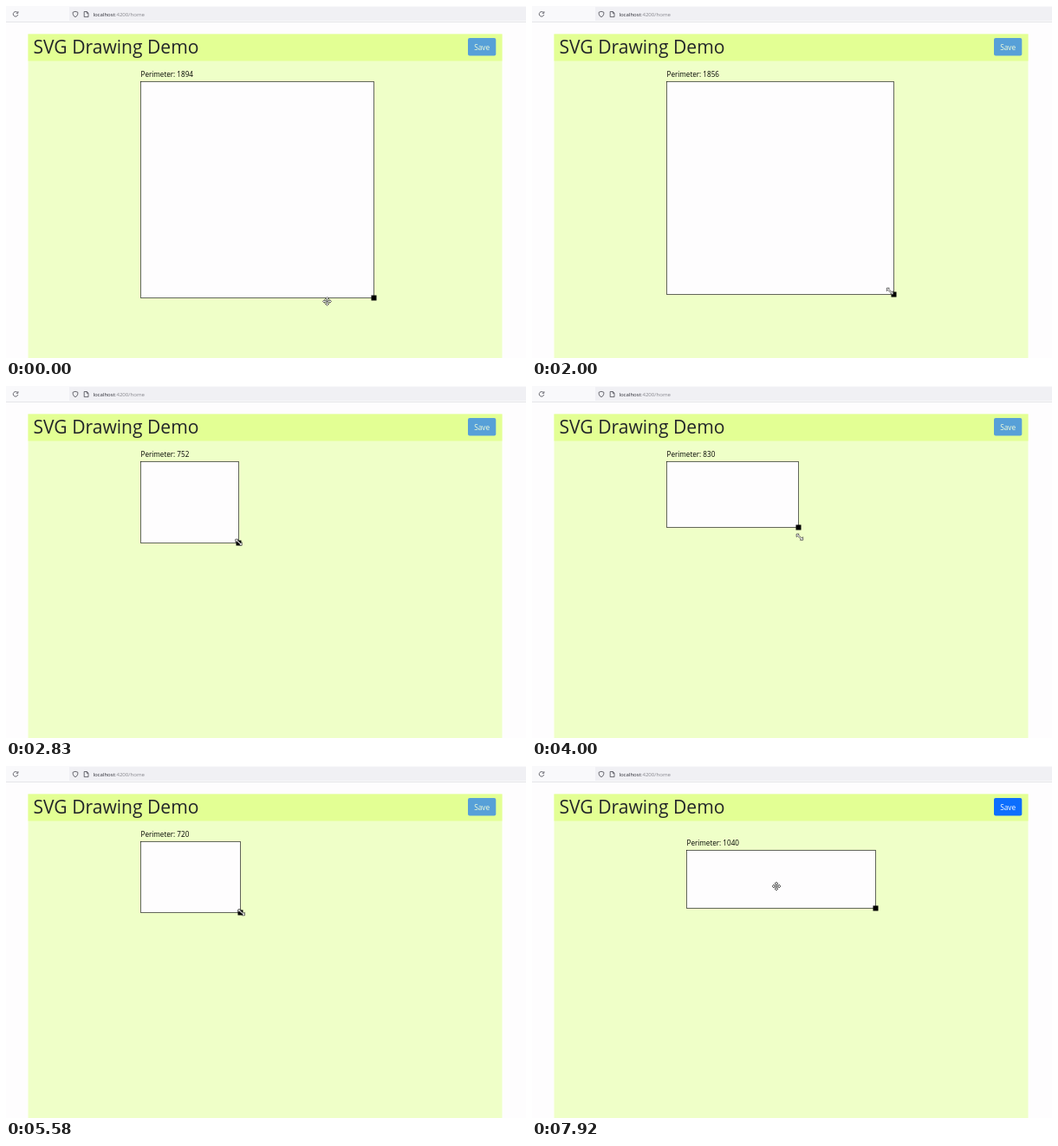
An HTML page that plays this animation: 600x407 px, repeating every 8000 ms.

```html
<!DOCTYPE html>
<html lang="en">
<head>
<meta charset="utf-8">
<title>SVG Drawing Demo</title>
<style>
  html, body { margin: 0; width: 100%; height: 100%; overflow: hidden; background: #fefdfe; }
  svg { display: block; width: 100%; height: 100%; font-family: "Open Sans", "Noto Sans", sans-serif; }
  .icon { fill: none; stroke: #4a4a52; stroke-width: .8; }
  .cursor path { fill: #fff; stroke: #2b2b2b; stroke-width: .7; }
</style>
</head>
<body>
<svg viewBox="0 0 600 407">
  <!-- browser bar -->
  <rect width="600" height="18" fill="#f9f9fb"/>
  <rect x="73" y="1" width="527" height="16" fill="#f0f0f4"/>
  <rect y="18" width="600" height=".7" fill="#dcdce0"/>
  <g class="icon">
    <path d="M13.4 7.8A2.8 2.8 0 1 0 13.8 10M13.9 6.2V8.3H11.8"/>
    <path d="M80 6.3L82.8 7.2V9.2Q82.6 11.6 80 12.8Q77.4 11.6 77.2 9.2V7.2Z"/>
    <path d="M90.2 6.5H93.3L95 8.2V12.6H90.2ZM93.2 6.6V8.3H95"/>
  </g>
  <text x="100.4" y="11.7" font-size="6.07" fill="#2a2a33">localhost<tspan fill="#85858c">:4200/home</tspan></text>

  <!-- page -->
  <rect x="25.5" y="32.5" width="547" height="374.5" fill="#efffc8"/>
  <rect x="25.5" y="32.5" width="547" height="31" fill="#e3ff94"/>
  <text x="31.5" y="54.8" font-size="21.05" fill="#212529">SVG Drawing Demo</text>
  <g id="save">
    <rect x="533" y="37" width="32.3" height="20.5" rx="2" fill="#0d6efd"/>
    <text x="549.2" y="50.6" font-size="8.3" fill="#fff" text-anchor="middle">Save</text>
  </g>

  <g id="shape">
    <text id="label" y="-5.5" font-size="8.12"></text>
    <rect id="box" fill="#fefdfe" stroke="#000" stroke-width=".6"/>
    <rect id="handle" width="6" height="6"/>
  </g>

  <g id="move" class="cursor">
    <path d="M-.8-.8V-3H-2L0-5 2-3H.8V-.8H3V-2L5 0 3 2V.8H.8V3H2L0 5-2 3H-.8V.8H-3V2L-5 0-3-2V-.8Z"/>
    <circle r=".8" fill="#2b2b2b"/>
  </g>
  <g id="resize" class="cursor">
    <path d="M-4-3.5h3l-1 1 4 3.6 1.5-1v3.5h-3.2l1-1.2-4-3.5-1.3 1z"/>
  </g>
</svg>
<script>
const STEPS_PER_MS = 12 / 1000, LOOP = 96, UNITS_PER_PX = 1.8245;

// Turning points of the resize drag: step, width, height.
const drag = [
  [21, 269, 250], [24, 262, 246.4], [34, 112.5, 93.7], [46, 150, 65],
  [57, 170, 186], [67, 115, 82.2], [77, 167, 65.2], [81, 217.5, 67.4]
];
const start = [155.5, 87.5], end = [178.5, 97.5];
const rest = [215, 254], grab = [103.5, 41.5]; // pointer before and after the drag, inside the shape

const $ = id => document.getElementById(id);
const setAttrs = (id, attrs) => {
  for (const name in attrs) $(id).setAttribute(name, attrs[name]);
};
const add = (a, b) => a.map((v, i) => v + b[i]);
const mix = (a, b, p) => a.map((v, i) => v + (b[i] - v) * p);
const units = px => Math.round(px * UNITS_PER_PX);

function ease(step, from, to) {
  const p = Math.min(1, Math.max(0, (step - from) / (to - from)));
  return p * p * (3 - 2 * p);
}

// Each leg eases on from where the previous one stopped.
function sizeAt(step) {
  return drag.slice(1).reduce(
    (size, [to, ...target], i) => mix(size, target, ease(step, drag[i][0], to)),
    drag[0].slice(1)
  );
}

// The pointer runs one step ahead of the corner it drags.
function pointerAt(step) {
  const approach = ease(step, 3, 20), leave = ease(step, 83, 90);
  const [x, y] = mix(mix(rest, sizeAt(step + 1), approach), grab, leave);
  return [x, y + 10 * Math.sin(Math.PI * approach)];
}

function draw(step) {
  const size = sizeAt(step), [width, height] = size.map(Math.round);
  const origin = mix(start, end, ease(step, 92, 95));

  setAttrs("shape", { transform: `translate(${origin})` });
  setAttrs("box", { width, height });
  setAttrs("handle", { x: width - 3, y: height - 3 });
  $("label").textContent = `Perimeter: ${2 * (units(size[0]) + units(size[1]))}`;
  setAttrs("save", { opacity: 0.65 + 0.35 * ease(step, 83, 86) });

  const resizing = step > 16 && step < 85;
  const transform = `translate(${add(origin, pointerAt(step))})`;
  setAttrs("move", { transform, opacity: resizing ? 0 : 1 });
  setAttrs("resize", { transform, opacity: resizing ? 1 : 0 });
}

function tick() {
  // The small offset keeps times rounded down to 10 ms on their own step.
  draw(Math.floor((performance.now() + 5) * STEPS_PER_MS) % LOOP);
  requestAnimationFrame(tick);
}
tick();
</script>
</body>
</html>
```
